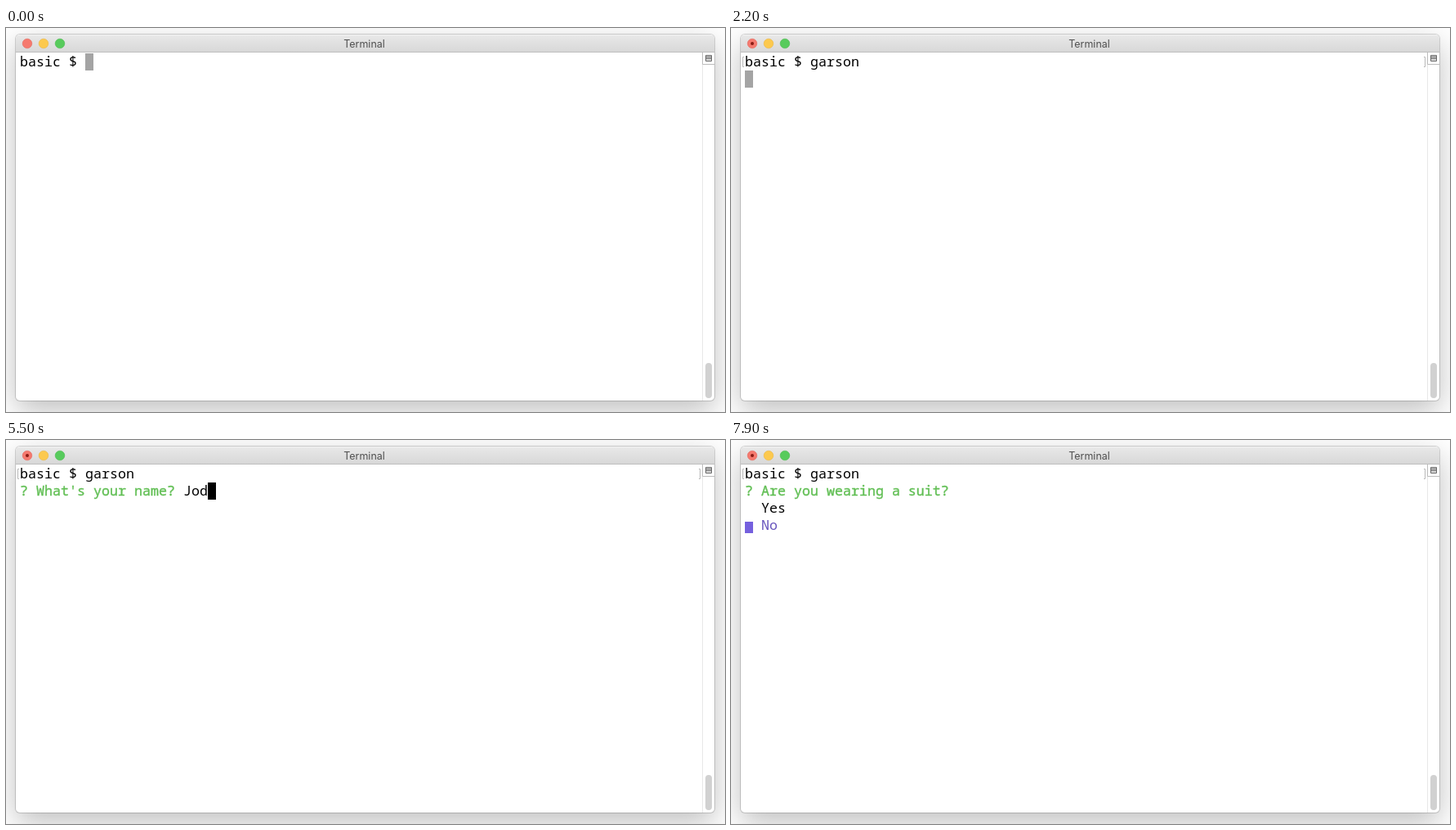
Animation, 880 px wide and 470 px high, one loop 8 s. Source, as an HTML page:

```html
<!DOCTYPE html>
<html lang="en">
<head>
<meta charset="utf-8">
<title>Terminal</title>
<style>
  html, body { margin: 0; width: 100%; height: 100%; overflow: hidden; background: #fff; }
  #stage { position: relative; width: 880px; height: 470px; overflow: hidden; }
  #window {
    position: absolute; left: 12px; top: 8px; width: 855px; height: 448px;
    border-radius: 5px; background: #fff;
    box-shadow: 0 0 0 1px rgba(0, 0, 0, .16), 0 12px 36px rgba(0, 0, 0, .26);
  }
  #bar {
    height: 21px; border-radius: 5px 5px 0 0; border-bottom: 1px solid #bdbdbd;
    background: linear-gradient(#f3f3f3, #e7e7e7 2px, #d8d8d8);
  }
  svg { position: absolute; left: 0; top: 0; display: block; }
  .title { font: 12.5px Inter, sans-serif; fill: #505050; text-anchor: middle; }
  #screen text { font: 16.667px "Noto Sans Mono", monospace; white-space: pre; }
  #screen .question { stroke: currentColor; stroke-width: .4; }
</style>
</head>
<body>
<div id="stage">
  <div id="window"><div id="bar"></div></div>
  <svg width="880" height="470" viewBox="0 0 880 470">
    <g stroke-width=".6">
      <circle cx="26" cy="19" r="5.8" fill="#f5796e" stroke="#e4685e"/>
      <circle cx="46" cy="19" r="5.8" fill="#fcc94e" stroke="#e9b544"/>
      <circle cx="66" cy="19" r="5.8" fill="#57cb5c" stroke="#4abb50"/>
    </g>
    <text class="title" x="438.5" y="24">Terminal</text>

    <path d="M852.5 30V456" stroke="#e8e8e8"/>
    <path d="M867 44.5H852.5V30" fill="none" stroke="#bcbcbc"/>
    <path d="M856.5 33.5h7v7h-7zM857 35.5h6M857 37.5h6" fill="#ddd" stroke="#666"/>
    <rect x="856" y="410" width="8" height="43" rx="4" fill="#d1d1d1"/>

    <g id="running" fill="none" stroke="#b8b8b8">
      <circle cx="26" cy="19" r="2" fill="#8a1c14" stroke="none"/>
      <path d="M16 35.5H14.5V47.5H16M848 35.5H849.5V47.5H848"/>
    </g>
    <g id="screen"></g>
  </svg>
</div>
<script>
const LOOP = 8000, CELL = 10, LINE = 21, LEFT = 17, TOP = 31;
const BLACK = '#000', GREEN = '#62bf55', HINT = '#b6b6b6',
      PURPLE = '#6754bd', MARKER = '#7560de', CURSOR = '#a4a4a4';

const text = (col, row, value, color = BLACK, kind = 'plain') =>
  `<text class="${kind}" x="${LEFT + col * CELL}" y="${TOP + row * LINE + 16}" fill="${color}" color="${color}">${value}</text>`;

const block = (col, row, color, inset = 0, height = LINE) =>
  `<rect x="${LEFT + col * CELL}" y="${TOP + row * LINE + inset}" width="${CELL}" height="${height}" fill="${color}"/>`;

const command = typed => text(0, 0, 'basic $ ' + typed);
const typing = typed => command(typed) + block(8 + typed.length, 0, CURSOR);
const ask = question => command('garson') + text(0, 1, '? ' + question, GREEN, 'question');

const waiting = () => command('garson') + block(0, 1, CURSOR);
const nameHint = () => ask("What's your name?") + text(20, 1, 'E.g. Halvin', HINT);
const nameTyped = name =>
  ask("What's your name?") + text(20, 1, name) + block(20 + name.length, 1, BLACK);
const choose = picked => ask('Are you wearing a suit?') +
  ['Yes', 'No'].map((label, i) => text(2, 2 + i, label, i === picked ? PURPLE : BLACK)).join('') +
  block(0, 2 + picked, MARKER, 6, 14);

const ENTER = 2200;
const steps = [
  [0, typing('')],
  [700, typing('g')],
  [800, typing('ga')],
  [1000, typing('gar')],
  [1300, typing('gars')],
  [1500, typing('garso')],
  [1800, typing('garson')],
  [ENTER, waiting()],
  [2500, nameHint()],
  [3900, nameTyped('J')],
  [4300, nameTyped('Jo')],
  [4700, nameTyped('Jod')],
  [5600, choose(0)],
  [6900, choose(1)],
  [7400, choose(0)],
  [7800, choose(1)]
];

const screenEl = document.getElementById('screen');
const runningEl = document.getElementById('running');
const start = performance.now();
let shown;

function draw() {
  const time = (performance.now() - start) % LOOP;
  const step = steps.findLast(([at]) => at <= time);
  if (step !== shown) {
    shown = step;
    screenEl.innerHTML = step[1];
    runningEl.style.display = step[0] >= ENTER ? '' : 'none';
  }
  requestAnimationFrame(draw);
}
draw();
</script>
</body>
</html>
```
